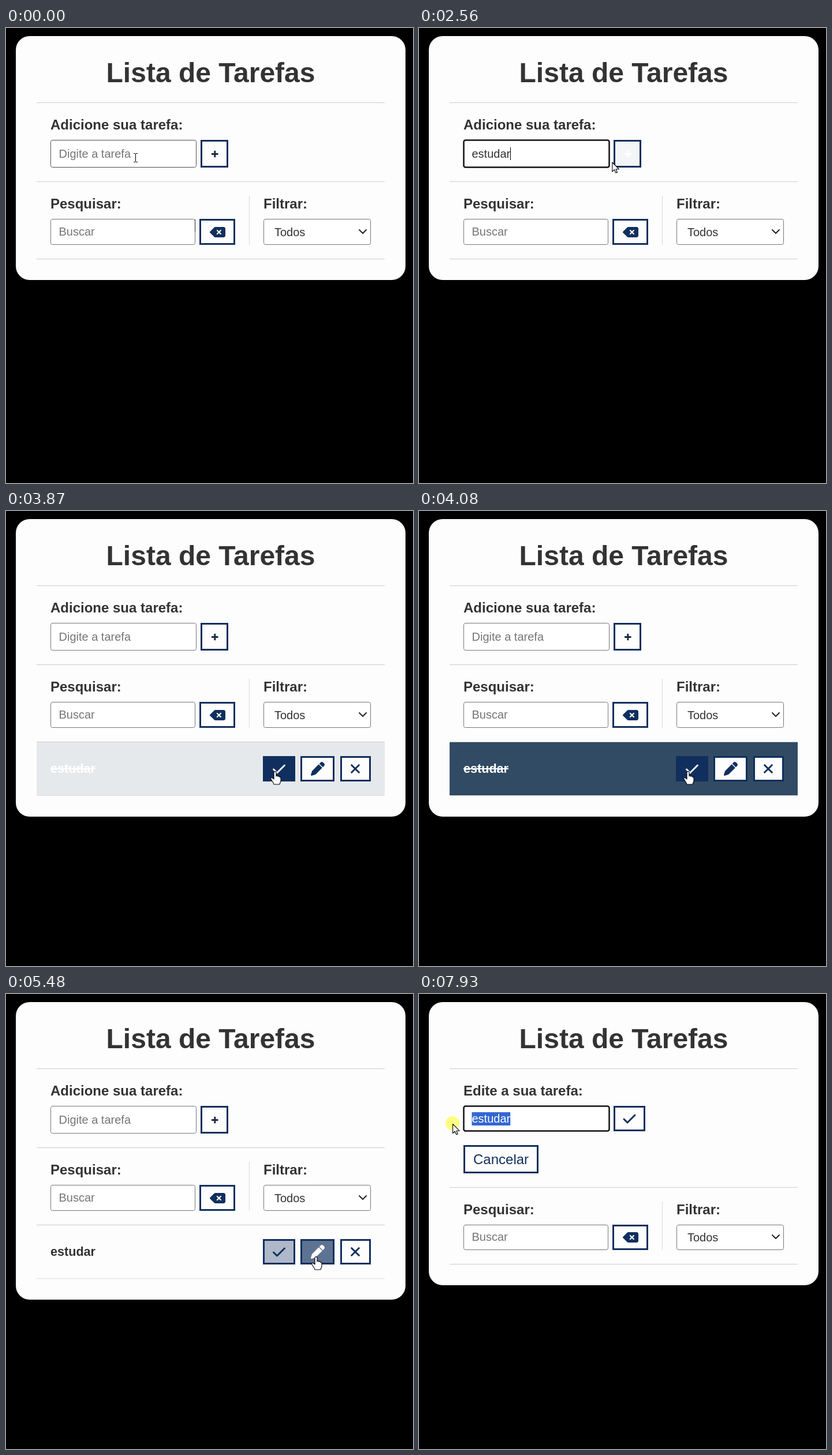
Write an HTML page with a canvas that moves like this. It is 705x789 px and loops after 8 s.

```html
<!DOCTYPE html>
<html lang="pt">
<head>
<meta charset="utf-8">
<title>Lista de Tarefas</title>
<style>
html, body { margin: 0; width: 705px; height: 789px; overflow: hidden; background: #000; }
canvas { display: block; }
</style>
</head>
<body>
<canvas id="stage" width="705" height="789"></canvas>
<script>
const c = document.getElementById('stage').getContext('2d');
const LOOP = 8000;
const NAVY = '#102f5e', PAPER = '#fdfdfd', INK = '#333', DONE = '#1c3854';
const SANS = '"Liberation Sans", Arial, sans-serif';
const ICON = 24 / 512;

const PEN = new Path2D('M363 19L314 68 444 198l48-49c25-25 25-65 0-90L453 19c-25-25-65-25-90 0zM292 90L59 323c-11 11-18 24-22 38L1 481c-5 18 12 35 30 30l120-35c14-4 27-12 37-22L422 220z');
const ERASE = new Path2D('M576 128c0-35-29-64-64-64H205c-17 0-33 7-45 19L9 233c-12 12-12 33 0 46L160 429c12 12 28 19 45 19H512c35 0 64-29 64-64z');
const ARROW = new Path2D('M.5.5V16.5L4.2 13.2 6.7 18.8 9.2 17.7 6.8 12.2H12z');
const HAND = new Path2D('M-2 1.5C-2-1 2-1 2 1.5V8C2 6 5 6.5 5 8.5C5 7 8 7.5 8 9.5C8 8.5 10 9 10 11V16C10 18 8 20 8 22H-2C-2 20-7 14-7.5 12C-8 10-5 9.5-2 13z');

// Pointer stops: time, x, y
const STOPS = [
  [2150, 224, 225], [2760, 371, 235], [2960, 371, 235], [3450, 466, 452],
  [5240, 466, 452], [5400, 537, 456], [6290, 537, 456], [6920, 205, 221],
  [7500, 205, 221], [7920, 58, 225]
];
const PRESSES = [[200, 330], [2760, 2900], [3740, 3830], [4870, 4930], [5690, 5820], [7470, 8000]];
const TYPED = [600, 800, 1070, 1270, 1420, 1690, 2090];
const WORD = 'estudar';

const clamp = p => Math.max(0, Math.min(1, p));
const smooth = p => p * p * (3 - 2 * p);

// CSS "ease" over 400 ms
function fade(t, start) {
  const p = clamp((t - start) / 400);
  let lo = 0, hi = 1, s = 0.5;
  for (let i = 0; i < 16; i++) {
    s = (lo + hi) / 2;
    if (0.75 * s * (1 - s) + s ** 3 < p) lo = s; else hi = s;
  }
  return p && (p === 1 ? 1 : 0.3 * (1 - s) ** 2 * s + 3 * (1 - s) * s * s + s ** 3);
}

function pointerAt(t) {
  let i = 0;
  while (i < STOPS.length - 2 && t > STOPS[i + 1][0]) i++;
  const [t0, x0, y0] = STOPS[i], [t1, x1, y1] = STOPS[i + 1];
  const p = smooth(clamp((t - t0) / (t1 - t0)));
  return { x: x0 + (x1 - x0) * p, y: y0 + (y1 - y0) * p };
}

function rect(x0, y0, x1, y1, color, alpha = 1) {
  c.globalAlpha = alpha;
  c.fillStyle = color;
  c.fillRect(x0, y0, x1 - x0, y1 - y0);
  c.globalAlpha = 1;
}

function text(str, x, y, size, color = INK, weight = '') {
  c.font = `${weight} ${size}px ${SANS}`;
  c.fillStyle = color;
  c.fillText(str, x, y);
}

const label = (str, x, y) => text(str, x, y, 24, INK, 'bold');
const rule = (y, color = '#ccc') => rect(53, y, 656, y + 1, color);

function line(points, width, color) {
  c.lineWidth = width;
  c.strokeStyle = color;
  c.lineCap = c.lineJoin = 'round';
  c.beginPath();
  points.forEach(([x, y]) => c.lineTo(x, y));
  c.stroke();
}

function shape(path, x, y, color, scale = 1, outline) {
  c.save();
  c.translate(x, y);
  c.scale(scale, scale);
  c.fillStyle = color;
  c.fill(path);
  if (outline) {
    c.lineWidth = 1.1;
    c.strokeStyle = outline;
    c.stroke(path);
  }
  c.restore();
}

function cross(x, y, r, width, color) {
  line([[x - r, y - r], [x + r, y + r]], width, color);
  line([[x - r, y + r], [x + r, y - r]], width, color);
}

const check = (x, y, color) => line([[x - 9.5, y + 1], [x - 3.5, y + 7], [x + 9.5, y - 6]], 3, color);

function button(x0, y0, x1, y1, hover = 0) {
  rect(x0, y0, x1, y1, NAVY);
  rect(x0 + 3, y0 + 3, x1 - 3, y1 - 3, PAPER);
  rect(x0, y0, x1, y1, NAVY, hover);
}

function field(x0, y0, x1, y1, hover, focus) {
  c.beginPath();
  c.roundRect(x0 + 0.5, y0 + 0.5, x1 - x0 - 1, y1 - y0 - 1, 3);
  c.fillStyle = '#fff';
  c.fill();
  c.lineWidth = focus ? 2.5 : 1;
  c.strokeStyle = focus ? '#101010' : hover ? '#4f4f4f' : '#767676';
  c.stroke();
}

function caret(x, y) {
  rect(Math.round(x), y, Math.round(x) + 1, y + 22, '#000');
}

const textEnd = n => {
  c.font = `20px ${SANS}`;
  return 91.5 + c.measureText(WORD.slice(0, n)).width;
};

function addForm(t, over) {
  const focus = t >= 200 && t < 3740;
  const hover = fade(t, 2540) - fade(t, 3040);
  const typed = t < 2900 ? TYPED.filter(k => t >= k).length : 0;
  label('Adicione sua tarefa:', 77, 176);
  field(77, 194, 330, 242, over(77, 194, 330, 242), focus);
  if (typed) text(WORD.slice(0, typed), 91.5, 225, 20);
  else text('Digite a tarefa', 91.5, 225, 20, '#757575');
  if (focus) caret(textEnd(typed), 207);
  button(337, 194, 385, 242, hover);
  const color = t > 2540 && t < 3040 ? '#fff' : '#1c2a45';
  rect(356, 217, 367.5, 220, color);
  rect(360.3, 212.8, 363.3, 224.2, color);
}

function editForm(t, over, pointer) {
  const dragging = t >= 7470;
  label('Edite a sua tarefa:', 77, 176);
  field(77, 194, 330, 238, over(77, 194, 330, 238), dragging);
  text(WORD, 91.5, 223, 20);
  if (dragging) {
    let from = WORD.length;
    while (from > 0 && pointer.x < (textEnd(from) + textEnd(from - 1)) / 2) from--;
    if (from === WORD.length) caret(textEnd(from), 205);
    else {
      const x = textEnd(from), end = textEnd(WORD.length);
      rect(x, 205, end, 228, '#3367d1');
      c.save();
      c.beginPath();
      c.rect(x, 205, end - x, 23);
      c.clip();
      text(WORD, 91.5, 223, 20, '#fff');
      c.restore();
    }
  }
  button(337, 194, 392, 238);
  check(364.5, 216, NAVY);
  button(77, 262, 207, 311);
  text('Cancelar', 94, 295, 24, NAVY);
}

function toolbar(top, bottom, over) {
  const y0 = 331 + top, y1 = 376 + bottom;
  rule(266 + top);
  rule(400 + bottom);
  rect(421, 291 + top, 422, y1, '#d8d8d8');
  label('Pesquisar:', 77, 313 + top);
  label('Filtrar:', 446, 313 + top);
  field(77, y0, 328, y1, over(77, y0, 328, y1));
  text('Buscar', 91.5, 360 + bottom, 20, '#757575');
  button(335, y0, 397, y1);
  shape(ERASE, 353, 342 + bottom, NAVY, ICON);
  cross(368.9, 354 + bottom, 3, 2.3, PAPER);
  field(446, y0, 632, y1, over(446, y0, 632, y1));
  text('Todos', 465, 361 + bottom, 20);
  const y = 350 + bottom;
  line([[612, y], [618, y + 6], [624, y]], 2, '#222');
}

function task(t) {
  const done = t >= 3830 && t < 4915;
  rect(53, 401, 656, 493, DONE, fade(t, 3830) - fade(t, 4915));
  rule(493, '#ddd');
  text(WORD, 77, 454, 21.6, done ? '#fff' : INK, 'bold');
  if (done) rect(77, 446, 155, 448, '#fff');
  button(445, 425, 501, 469, fade(t, 3330) - fade(t, 5325));
  check(473, 447, t > 3330 && t < 5325 ? '#fff' : NAVY);
  button(510, 425, 569, 469, fade(t, 5325));
  shape(PEN, 528, 435, t > 5325 ? '#fff' : NAVY, ICON);
  button(579, 425, 632, 469);
  cross(605, 447, 6.3, 3, NAVY);
}

function drawPointer(t, { x, y }, kind) {
  if (PRESSES.some(([from, to]) => t >= from && t < to)) {
    c.fillStyle = 'rgba(255,255,0,.5)';
    c.beginPath();
    c.arc(x, y - 1, 12, 0, 7);
    c.fill();
  }
  if (kind === 'text') {
    x = Math.round(x);
    y = Math.round(y);
    rect(x, y - 7, x + 1, y + 7, '#000');
    for (const end of [y - 8, y + 7]) {
      rect(x - 3, end, x, end + 1, '#000');
      rect(x + 1, end, x + 4, end + 1, '#000');
    }
  } else shape(kind === 'hand' ? HAND : ARROW, x, y, '#fff', 1, '#000');
}

function draw(t) {
  const pointer = pointerAt(t);
  const over = (x0, y0, x1, y1) => pointer.x >= x0 && pointer.x < x1 && pointer.y >= y0 && pointer.y < y1;
  const editing = t >= 5820, listed = t >= 2900 && !editing;
  const top = editing ? 69 : 0, bottom = editing ? 68 : 0;

  rect(0, 0, 705, 789, '#000');
  c.fillStyle = PAPER;
  c.beginPath();
  c.roundRect(17, 14, 675, (listed ? 530 : 437 + bottom) - 14, 24);
  c.fill();
  c.textAlign = 'center';
  text('Lista de Tarefas', 354.5, 94, 48, INK, 'bold');
  c.textAlign = 'left';
  rule(129);
  if (editing) editForm(t, over, pointer);
  else addForm(t, over);
  toolbar(top, bottom, over);
  if (t < 200) rect(327, 332, 328, 353, '#222');
  if (listed) task(t);

  const onText = over(77, 194, 330, 242 - top / 17) || over(77, 331 + top, 328, 376 + bottom);
  const onButton = over(337, 194, editing ? 392 : 385, 242) || over(335, 331 + top, 397, 376 + bottom) ||
    listed && (over(445, 425, 501, 469) || over(510, 425, 569, 469));
  drawPointer(t, pointer, onText ? 'text' : onButton ? 'hand' : 'arrow');
}

function tick() {
  draw(performance.now() % LOOP);
  requestAnimationFrame(tick);
}
tick();
</script>
</body>
</html>
```
